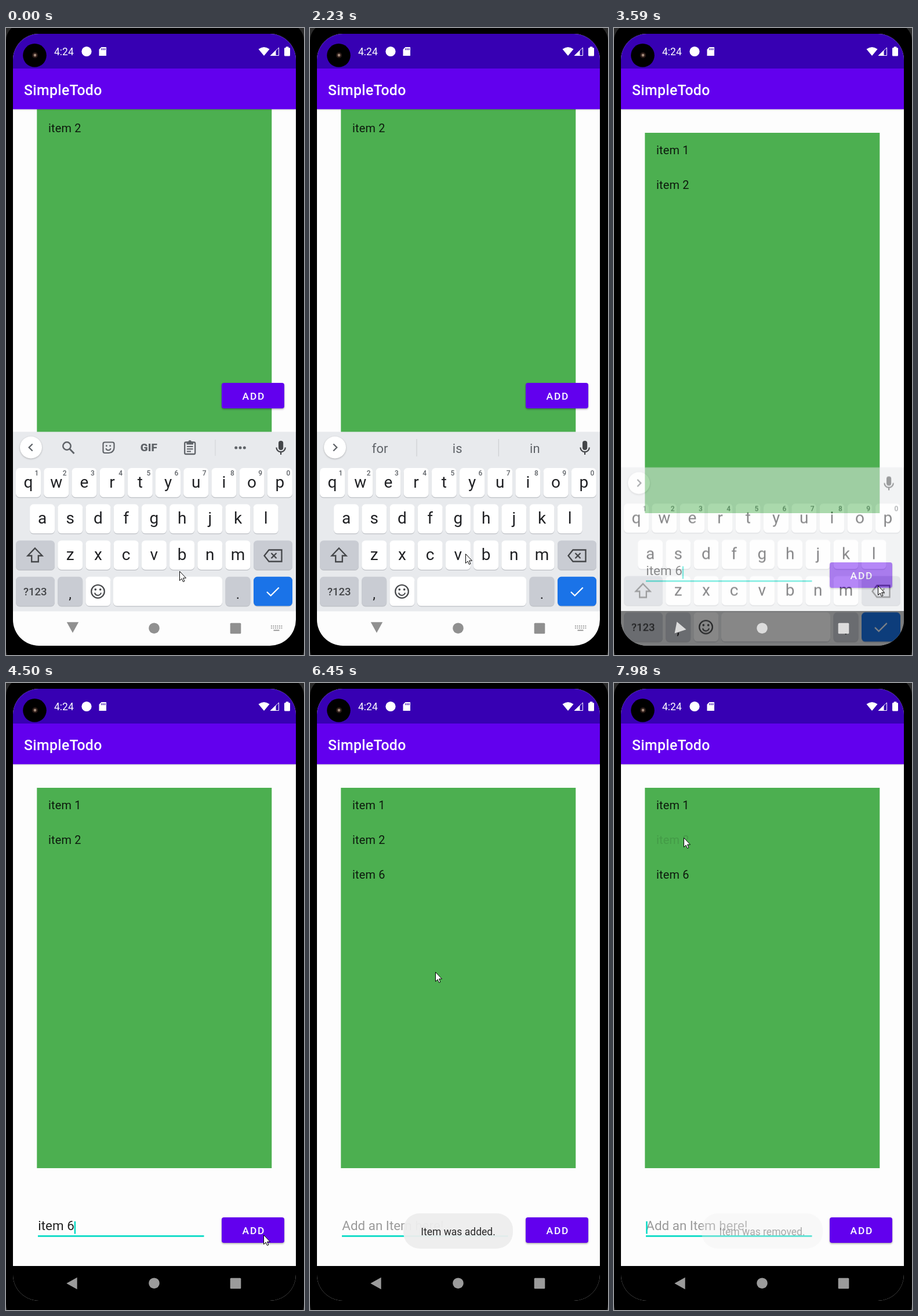
These frames come from a looping animation (514x1083 px, 8000 ms). An HTML page with a canvas:

```html
<!DOCTYPE html>
<html lang="en">
<head>
<meta charset="utf-8">
<title>Todo app</title>
<style>
  html, body { margin: 0; width: 100%; height: 100%; overflow: hidden; background: #000; }
  canvas { display: block; width: 514px; height: 1083px; }
</style>
</head>
<body>
<canvas id="stage" width="514" height="1083"></canvas>
<script>
const LOOP = 8000, STEP = 130, W = 514, H = 1083;
const GREEN = '#4caf50', PURPLE = '#6200ee', TEAL = '#03dac5', INK = '#444649', GRAY = '#5f6368';
const PRESS = 3450, HIDE = 3590, HIDDEN = 3720, ADD = 4750, REMOVE = 7980, BLINK = 495;
const screen = document.getElementById('stage').getContext('2d');
const layer = document.createElement('canvas');
layer.width = W;
layer.height = H;
const board = layer.getContext('2d');
let c = screen;

// pointer moves: start time, number of steps, end point
const MOVES = [
  [270, 2, 268, 908], [2880, 1, 207, 894], [3030, 4, 457, 965], [HIDE, 1, 455, 963],
  [HIDDEN, 3, 437, 921], [4130, 3, 444, 953], [5170, 2, 402, 765], [5950, 1, 318, 716],
  [6450, 1, 216, 499], [6600, 6, 120, 267]
];
const WORDS = [[1320, ''], [1440, 'in I is'], [1720, "its it it's"], [1970, 'Item item items'], [2230, 'for is in'], [HIDE, '']];

const ramp = (t, a, b) => Math.min(1, Math.max(0, (t - a) / (b - a)));
const easeOut = p => 1 - (1 - p) ** 2;

function pointerAt(t) {
  let x = 299, y = 938;
  for (const [start, n, endX, endY] of MOVES) {
    if (t < start) break;
    const p = easeOut(Math.min(1, (Math.floor((t - start) / STEP) + 1) / n));
    x += (endX - x) * p;
    y += (endY - y) * p;
  }
  return [x, y];
}

function caretOn(t) {
  const reset = t < ADD ? PRESS + 45 : ADD;
  return Math.floor((t - reset) / BLINK) % 2 === 0;
}

function rect(x, y, w, h, fill) {
  c.fillStyle = fill;
  c.fillRect(x, y, w, h);
}
function box(x, y, w, h, r, fill) {
  c.beginPath();
  c.roundRect(x, y, w, h, r);
  c.fillStyle = fill;
  c.fill();
}
function disc(x, y, r, fill) {
  c.beginPath();
  c.arc(x, y, r, 0, Math.PI * 2);
  c.fillStyle = fill;
  c.fill();
}
function trace(pts, closed) {
  c.beginPath();
  for (let i = 0; i < pts.length; i += 2) c.lineTo(pts[i], pts[i + 1]);
  if (closed) c.closePath();
}
function shape(pts, fill) {
  trace(pts, true);
  c.fillStyle = fill;
  c.fill();
}
function stroke(color, width) {
  c.strokeStyle = color;
  c.lineWidth = width;
  c.stroke();
}
function line(pts, color, width, closed) {
  trace(pts, closed);
  stroke(color, width);
}
function ring(x, y, r, color, width, from = 0, to = Math.PI * 2) {
  c.beginPath();
  c.arc(x, y, r, from, to);
  stroke(color, width);
}
function face(x, y, r, color) {
  for (const d of [-0.75, 0.75]) disc(x + d * r, y - 0.65 * r, r / 3, color);
  ring(x, y + 0.15 * r, r, color, 2, 0.2, Math.PI - 0.2);
}
function triangle(x, y, r, angle, fill) {
  c.save();
  c.translate(x, y);
  c.rotate(angle);
  shape([-r, 0, 0.8 * r, -r, 0.8 * r, r], fill);
  c.restore();
}
function text(str, x, y, size, color, { align = 'left', weight = 400, gap = 0 } = {}) {
  c.font = `${weight} ${size}px Roboto, sans-serif`;
  c.letterSpacing = gap + 'px';
  c.textAlign = align;
  c.fillStyle = color;
  c.fillText(str, x, y);
}
function faded(alpha, draw) {
  if (alpha <= 0) return;
  c.save();
  c.globalAlpha = alpha;
  draw();
  c.restore();
}
function shadow(blur, dy, alpha, draw) {
  c.save();
  c.shadowColor = `rgba(0,0,0,${alpha})`;
  c.shadowBlur = blur;
  c.shadowOffsetY = dy;
  draw();
  c.restore();
}

function drawStatus() {
  rect(12, 10, 488, 60, '#3700b3');
  disc(49.5, 47.3, 20.3, '#000');
  disc(50, 47, 5, '#2a1b17');
  disc(50, 47, 2.4, '#a08878');
  text('4:24', 83, 47, 17.5, '#fff');
  disc(139, 40.5, 8.6, '#fff');
  shape([164.5, 33, 173, 33, 173, 48, 160.5, 48, 160.5, 37], '#fff');
  for (let i = 0; i < 3; i++) rect(164.7 + i * 2.7, 35, 1.3, 3.2, '#3700b3');
  c.beginPath();
  c.moveTo(445, 48);
  c.lineTo(435.5, 36.5);
  c.quadraticCurveTo(445, 29.5, 454.5, 36.5);
  c.fillStyle = '#fff';
  c.fill();
  line([456.5, 47.5, 470.5, 34, 470.5, 47.5], '#fff', 1, true);
  shape([455.5, 48, 465.5, 38.3, 465.5, 48], '#fff');
  box(480, 34, 10, 14.5, 1.5, '#fff');
  rect(482.7, 32.3, 4.6, 2.5, '#fff');
}

function drawBar() {
  shadow(3, 1, 0.3, () => rect(12, 70, 488, 70.3, PURPLE));
  text('SimpleTodo', 31, 115.5, 24.85, '#fff', { weight: 500, gap: 0.31 });
}

function drawButton(y, ripple) {
  shadow(3, 1.5, 0.35, () => box(372, y, 108, 44, 4, PURPLE));
  if (ripple) box(372, y, 108, 44, 4, `rgba(255,255,255,${ripple})`);
  text('ADD', 427.4, y + 29, 17.4, '#fff', { align: 'center', weight: 500, gap: 1.8 });
}

function drawItem(n, y, alpha = 1) {
  faded(alpha, () => text('item ' + n, 73, y, 19.9, '#0d1a0d', { gap: 0.19 }));
}

function drawForm(t) {
  const added = t >= ADD;
  text(added ? 'Add an Item here!' : 'item 6', 55.3, 945, 22.4, added ? '#9a9a9a' : '#222');
  rect(55, 954, 286.5, 2.7, TEAL);
  if (caretOn(t)) rect(added ? 55.2 : 117.7, 929.8, 2.5, 21.7, TEAL);
  drawButton(923, added ? 0.2 * (1 - ramp(t, ADD, 5020)) : 0);
}

function drawApp(t) {
  rect(12, 10, 488, 1058, '#fdfdfd');
  if (t < HIDE) {
    rect(53.3, 140, 405, 558, GREEN);
    drawItem(2, 180);
    drawButton(613, 0);
  } else {
    rect(53.3, 181, 405, 657, GREEN);
    drawItem(1, 218);
    drawItem(2, 278, t < REMOVE ? 1 : 0.13);
    if (t >= ADD) drawItem(6, 337.5, ramp(t, ADD - 40, ADD + 120));
    drawForm(t);
  }
  drawBar();
  drawStatus();
}

function drawKey(x, y, w, fill) {
  box(x, y + 1.2, w, 50.5, 6.5, '#bcbfc4');
  box(x, y, w, 50.5, 6.5, fill);
}

function drawTools() {
  ring(105, 722, 6.7, GRAY, 2.5);
  line([109.8, 727, 117.5, 735], GRAY, 2.8);
  c.beginPath();
  c.roundRect(167.5, 715.5, 19, 18.5, [3, 3, 9, 3]);
  stroke(GRAY, 2.2);
  face(176.5, 724.5, 4.2, GRAY);
  text('GIF', 246.3, 730.7, 19, GRAY, { align: 'center', weight: 900 });
  c.beginPath();
  c.roundRect(308.2, 715.5, 18, 20.5, 2);
  stroke(GRAY, 2.3);
  rect(311.5, 714.5, 11.5, 5, GRAY);
  disc(317.2, 714.5, 2.6, GRAY);
  for (let i = 0; i < 3; i++) rect(312, 722 + i * 4.2, i < 2 ? 10.5 : 7, 2, GRAY);
  rect(360.5, 711, 1, 28, '#cfd1d5');
  for (let i = -1; i < 2; i++) disc(404 + i * 7.3, 725, 2.5, GRAY);
}

function drawStrip(t) {
  const tools = t < WORDS[0][0] || (t >= 2880 && t < HIDE);
  const d = tools ? -1 : 1;
  shadow(3, 1, 0.25, () => disc(43, 724.5, 19, '#fff'));
  line([43 - 2.7 * d, 718.5, 43 + 3.3 * d, 724.5, 43 - 2.7 * d, 730.5], GRAY, 2.3);
  if (tools) drawTools();
  else {
    const words = WORDS.filter(w => t >= w[0]).pop()[1];
    if (words) {
      words.split(' ').forEach((w, i) => text(w, 120.6 + i * 133.6, 734, 22, GRAY, { align: 'center' }));
      for (const x of [183.5, 324.8]) rect(x, 710, 1, 30, '#c8cace');
    }
  }
  // microphone
  box(470, 713, 8.2, 16, 4.1, INK);
  ring(474.1, 724.5, 7.7, INK, 2.2, 0, Math.PI);
  rect(473, 732, 2.2, 5, INK);
}

function drawKeyboard(t) {
  const side = '#c9ccd3', dark = '#202124', pitch = 48.2, top = 760, row = 62.6;
  const mid = { align: 'center' }, small = { align: 'center', weight: 500 };
  rect(12, 697.5, 488, 310, '#e8eaed');
  drawStrip(t);
  ['qwertyuiop', 'asdfghjkl', 'zxcvbnm'].forEach((keys, r) => {
    const y = top + r * row;
    [...keys].forEach((k, i) => {
      const x = 17 + (r / 2 + (r > 1 ? 0.5 : 0) + i) * pitch;
      drawKey(x, y, 43, '#fff');
      text(k, x + 21.5, y + 33.6, 28, dark, mid);
      if (r === 0) text((i + 1) % 10, x + 36, y + 13.3, 12, GRAY, small);
    });
  });

  const y3 = top + 2 * row, y4 = top + 3 * row;
  for (const x of [17, 427]) drawKey(x, y3, 67, side);
  line([50, 898.5, 62.5, 911.5, 55.8, 911.5, 55.8, 922, 44.2, 922, 44.2, 911.5, 37.5, 911.5], INK, 2.3, true);
  line([445.5, 911.5, 453.5, 901.5, 475.5, 901.5, 475.5, 921.5, 453.5, 921.5], INK, 2.3, true);
  for (const d of [-4.5, 4.5]) line([462 - d, 907, 462 + d, 916], INK, 2.3);

  const pressed = t >= PRESS && t < HIDE;
  drawKey(17, y4, 67, side);
  drawKey(89.2, y4, 43, side);
  drawKey(137.4, y4, 43, '#fff');
  drawKey(185, y4, 188, '#fff');
  drawKey(378.5, y4, 43, side);
  drawKey(427, y4, 67, pressed ? '#185abc' : '#1a73e8');
  text('?123', 50.3, 980.3, 18.6, INK, small);
  text(',', 110.7, 986, 24, dark, mid);
  text('.', 400, 986, 24, dark, mid);
  ring(158.5, 973.3, 11.3, INK, 2.2);
  face(158.5, 973.5, 5.6, INK);
  line([450, 974, 456.7, 980.5, 470.7, 966.5], '#fff', 2.3);
}

function drawNav(t) {
  const typing = t < HIDE, moving = !typing && t < HIDDEN;
  const color = moving ? '#dcdcdc' : typing ? '#909090' : '#9b9b9b';
  const turn = typing ? -Math.PI / 2 : moving ? -2.95 : 0;
  triangle(typing ? 115 : 114.5, typing ? 1034.5 : 1037, 10.2, turn, color);
  disc(255.5, 1036.7, 9.3, color);
  box(386.7, 1027.7, 18.6, 18.6, 1.5, color);
  if (typing) {
    for (let i = 0; i < 12; i++) rect(457 + (i % 6) * 3.5, 1032 + (i > 5 ? 3.5 : 0), 1.8, 1.8, color);
    rect(461.5, 1039.5, 10, 1.8, color);
  }
}

function drawToast(t) {
  const removed = t >= REMOVE;
  const w = removed ? 209 : 189;
  const alpha = removed ? 0.36 : 0.95 * (ramp(t, 4880, 5170) - ramp(t, 6960, 7230));
  faded(alpha, () => {
    box(255.5 - w / 2, 916, w, 61, 28, '#eeeeee');
    text(removed ? 'Item was removed.' : 'Item was added.', 255.5, 953.5, 17.55, '#1c1c1c', { align: 'center' });
  });
}

function drawPointer(t) {
  const [x, y] = pointerAt(t);
  c.save();
  c.translate(Math.round(x) + 0.5, Math.round(y) + 0.5);
  shape([0, 0, 0, 16, 3.6, 12.6, 6, 18, 8.4, 17, 6.1, 11.6, 11, 11.6], '#fff');
  stroke('#000', 1);
  c.restore();
}

function draw(t) {
  c = screen;
  rect(0, 0, W, H, '#2a2a2a');
  box(0, -8, W, 1110, 30, '#000');
  c.save();
  c.beginPath();
  c.roundRect(12, 10, 488, 1057, 45);
  c.clip();
  drawApp(t);
  if (t >= HIDE) rect(12, 1007, 488, 61, '#000');
  if (t < HIDDEN) {
    const sliding = t >= HIDE;
    c = board;
    c.clearRect(0, 0, W, H);
    drawKeyboard(t);
    c = screen;
    faded(sliding ? 0.53 : 1, () => c.drawImage(layer, 0, sliding ? 61.5 : 0));
  }
  drawNav(t);
  drawToast(t);
  c.restore();
  drawPointer(t);
}

function tick() {
  draw(performance.now() % LOOP);
  requestAnimationFrame(tick);
}
tick();
</script>
</body>
</html>
```
